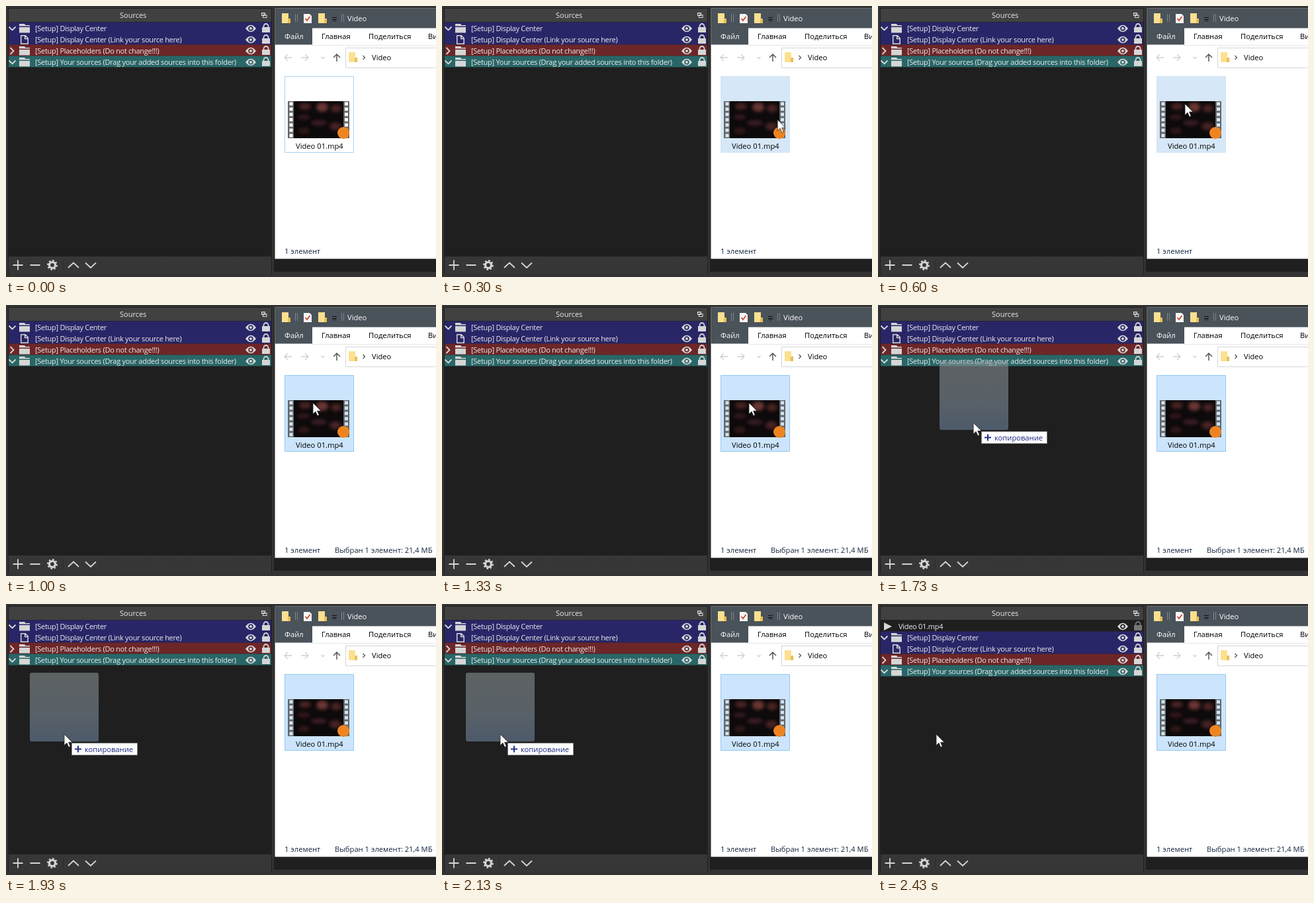
An HTML page that plays this animation: 650x410 px, repeating every 2460 ms.

```html
<!DOCTYPE html>
<html lang="en">
<head>
<meta charset="utf-8">
<style>
  html, body { margin: 0; height: 100%; overflow: hidden; background: #333; }
  svg { display: block; width: 650px; height: 410px; }
  text { font: 11.2px "Open Sans", "Noto Sans", sans-serif; fill: #000; }
  .panel text { font-size: 11px; fill: #ececec; letter-spacing: -.28px; }
  .panel .title { letter-spacing: 0; }
  .light { fill: #d6d6d6; }
  .line { fill: none; stroke: #d6d6d6; stroke-width: 1.8; }
  .status { fill: #14263f; }
  #item { --back: #fff; --edge: #a9d3f5; }
  #item.hover { --back: #d6e7f7; --edge: #d6e7f7; }
  #item.selected { --back: #cce5fc; --edge: #94c8f0; }
  .holes { stroke: var(--back); stroke-width: 5; stroke-dasharray: 5 3; }
</style>
</head>
<body>
<svg viewBox="0 0 650 410">
  <defs>
    <linearGradient id="bar" x2="0" y2="1">
      <stop stop-color="#414141"/><stop offset="1" stop-color="#363636"/>
    </linearGradient>
    <linearGradient id="glass" x2="0" y2="1">
      <stop stop-color="#91999c"/><stop offset=".6" stop-color="#8797a3"/><stop offset="1" stop-color="#748ba9"/>
    </linearGradient>
    <filter id="soft"><feGaussianBlur stdDeviation="2.5"/></filter>
    <clipPath id="screen"><path d="M436 145h73v54h-73z"/></clipPath>
    <path id="eye" fill-rule="evenodd" d="M-8 0Q0-10.500 8 0Q0 10.500-8 0ZM0-3.800a3.800 3.800 0 1 0 .01 0ZM0-2a2 2 0 1 1-.01 0Z"/>
    <g id="lock">
      <path d="M-6-1.500H6V6.500H-6z"/>
      <path d="M-3.500-1V-3a3.500 3.500 0 0 1 7 0v2" fill="none" stroke="currentColor" stroke-width="1.800"/>
    </g>
    <g id="marks" class="light" color="#d6d6d6">
      <use href="#eye" x="370" y="34"/><use href="#lock" x="393" y="33.500"/>
    </g>
    <path id="group" class="light" d="M20 27h8l1.500 2H36v1.500H20zM20 32h16v8.500H20z"/>
    <g id="folder">
      <path d="M0 0h10v8h3v7H0z" fill="#fbe08f"/><path d="M10 8h3v7h-4v-5z" fill="#e9bf55"/>
    </g>
  </defs>

  <g class="panel">
    <path d="M3 3h399v403H3z" fill="#1f1f1f"/>
    <path d="M4 4h397v20H4zM4 379h397v27H4z" fill="url(#bar)"/>
    <text class="title" x="172" y="18">Sources</text>
    <path class="line" style="stroke-width:1.1" d="M386.500 10.500h5v4h-5zM388.500 13.500h5.500v4h-5.500zM386 11h6"/>

    <g id="added">
      <path class="light" d="M9 28l12 6-12 6z"/>
      <text x="31" y="38">Video 01.mp4</text>
      <use class="light" href="#eye" x="370" y="34"/>
      <g fill="#777" color="#777"><use href="#lock" x="393" y="33.500"/></g>
    </g>
    <g id="rows">
      <path d="M4 24.500h397v34H4z" fill="#292668"/>
      <path d="M4 58.500h397v17H4z" fill="#6d2628"/>
      <path d="M4 75.500h397v17H4z" fill="#296667"/>
      <path class="line" d="M4.500 31.500l5 5 5-5M6.500 63l5 5-5 5M4.500 82.500l5 5 5-5"/>
      <use href="#group"/><use href="#group" y="34"/><use href="#group" y="51"/>
      <path class="line" style="stroke-width:1.5" d="M22.700 44.700h6.500l4 4v8.500H22.700zM28.700 45v4.500h4"/>
      <use href="#marks"/><use href="#marks" y="17"/><use href="#marks" y="34"/><use href="#marks" y="51"/>
      <text x="44" y="38">[Setup] Display Center</text>
      <text x="44" y="55">[Setup] Display Center (Link your source here)</text>
      <text x="44" y="72">[Setup] Placeholders (Do not change!!!)</text>
      <text x="44" y="89">[Setup] Your sources (Drag your added sources into this folder)</text>
    </g>

    <path class="line" d="M10.500 392h15M18 384.500v15M36.500 392h15M94 396l8-7.500 8 7.500M120 388.500l8 7.500 8-7.500"/>
    <circle class="line" cx="70" cy="392" r="4.500" style="stroke-width:3.2"/>
    <circle class="line" cx="70" cy="392" r="6.800" pathLength="16" stroke-dasharray="1" style="stroke-width:2.200"/>
    <path d="M86.500 384v16" stroke="#2b2b2b"/>
  </g>

  <path d="M405 0h245v402H405z" fill="#1f1f1f"/>
  <path d="M405 0h245v3H405z" fill="#333"/>
  <path d="M406.500 3.500h243.500v379H406.500z" fill="#fff"/>
  <path d="M406.500 3.500h243.500v30H406.500zM406.500 33.500H463v25h-56.500z" fill="#4a525a"/>
  <use href="#folder" x="417" y="11"/><use href="#folder" x="472" y="11"/>
  <path d="M437.500 12v12M440.500 12v12M507.500 12v12M510.500 12v12" stroke="#7f868c"/>
  <path d="M450 12h9l3 3v11h-12z" fill="#f7f7f7"/>
  <path d="M452.500 19l2.500 3 4.500-6" fill="none" stroke="#d0482c" stroke-width="1.8"/>
  <path d="M493 17.500h7M493.500 20.500h6l-3 3z" fill="none" stroke="#111"/>
  <text x="516" y="23" style="fill:#fff">Video</text>
  <text x="421" y="50" style="fill:#fff">Файл</text>
  <text x="477" y="50">Главная</text>
  <text x="548" y="50">Поделиться</text>
  <text x="638" y="50">Вид</text>
  <path d="M463 59.500h187" stroke="#e6e6e6"/>
  <path d="M650 63.500H513.500v30H650" fill="none" stroke="#d5d5d5"/>
  <path d="M432 78h-11m5-5l-5 5 5 5M446 78h11m-5-5l5 5-5 5M476.500 77l2.500 2.500 2.500-2.500" fill="none" stroke="#d0d0d0" stroke-width="1.300"/>
  <path d="M500 84V73m-5 5l5-5 5 5" fill="none" stroke="#555" stroke-width="1.500"/>
  <use href="#folder" x="518" y="70"/>
  <path d="M539.500 75l3 3-3 3" fill="none" stroke="#555" stroke-width="1.300"/>
  <text x="553" y="82">Video</text>

  <g id="item">
    <path d="M421.500 106.500h104v115h-104z" style="fill:var(--back);stroke:var(--edge)"/>
    <path d="M426 144h93v56h-93z" fill="#666"/>
    <path class="holes" d="M431 145.500v53M514.500 145.500v53"/>
    <path d="M435 144h75v56h-75z" fill="#0d0a0b"/>
    <g clip-path="url(#screen)">
      <g filter="url(#soft)" fill="#4a2322">
        <ellipse cx="452" cy="152" rx="9" ry="5"/>
        <ellipse cx="478" cy="153" rx="9" ry="7" fill="#6a3532"/>
        <ellipse cx="499" cy="155" rx="8" ry="6"/>
        <ellipse cx="450" cy="168" rx="10" ry="4" fill="#33191c"/>
        <ellipse cx="473" cy="177" rx="12" ry="4" fill="#3a1c26"/>
        <ellipse cx="498" cy="182" rx="9" ry="6"/>
        <ellipse cx="450" cy="189" rx="9" ry="5" fill="#2f1515"/>
      </g>
    </g>
    <circle cx="510" cy="192" r="9" fill="#ee8420"/>
    <text x="438" y="216">Video 01.mp4</text>
  </g>
  <text class="status" x="421" y="375">1 элемент</text>
  <text class="status" id="chosen" x="497" y="375">Выбран 1 элемент: 21,4 МБ</text>

  <g id="ghost">
    <rect x="-52" y="-93" width="104" height="104" rx="3" fill="url(#glass)" opacity=".55"/>
    <g id="tip">
      <path d="M11.500 13.500h99v18h-99z" fill="#fff" stroke="#8a8a8a"/>
      <path d="M16 22.500h10M21 17.500v10" stroke="#23308c" stroke-width="2"/>
      <text x="31" y="27" style="fill:#1a2680">копирование</text>
    </g>
  </g>
  <path id="cursor" d="M0 0v17l4-3.800 2.700 6.300 2.600-1.100-2.700-6.200h5.600z" fill="#fff" stroke="#222" stroke-width=".8"/>
</svg>
<script>
  const LOOP = 2460, ENTER = 230, REST = 530, CLICK = 820, DRAG = 1368, STOP = 1848, DROP = 2150;
  const parts = {};
  for (const el of document.querySelectorAll('svg > [id], .panel [id], #tip')) parts[el.id] = el;

  const progress = (t, from, to) => Math.min(1, Math.max(0, (t - from) / (to - from)));
  const show = (el, on) => el.setAttribute('visibility', on ? 'visible' : 'hidden');
  const move = (el, x, y) => el.setAttribute('transform', `translate(${x} ${y})`);

  function pointer(t) {
    if (t < DRAG) {
      const left = (1 - progress(t, ENTER, REST)) ** 3;
      return [464 + 97 * left, 148 + 54 * left];
    }
    const u = progress(t, DRAG, STOP), s = u * u * (3 - 2 * u);
    return [464 - 376 * s, 148 - 2 * Math.sin(Math.PI * s) + 49 * progress(s, .46, 1) ** 1.4];
  }

  function draw(t) {
    const [x, y] = pointer(t), [gx, gy] = pointer(Math.max(0, t - 1));
    const dragging = t >= DRAG && t < DROP, dropped = t >= DROP;
    show(parts.cursor, t >= ENTER);
    move(parts.cursor, x, y);
    show(parts.ghost, dragging);
    move(parts.ghost, Math.round(gx), Math.round(gy));
    show(parts.tip, dragging && x < 403);
    show(parts.added, dropped);
    move(parts.rows, 0, dropped ? 17 : 0);
    show(parts.chosen, t >= CLICK);
    const over = t >= ENTER && x < 526;
    parts.item.setAttribute('class', t >= CLICK ? 'selected' : over ? 'hover' : '');
  }

  const start = performance.now();
  function tick() {
    draw((performance.now() - start) % LOOP);
    requestAnimationFrame(tick);
  }
  tick();
</script>
</body>
</html>
```
